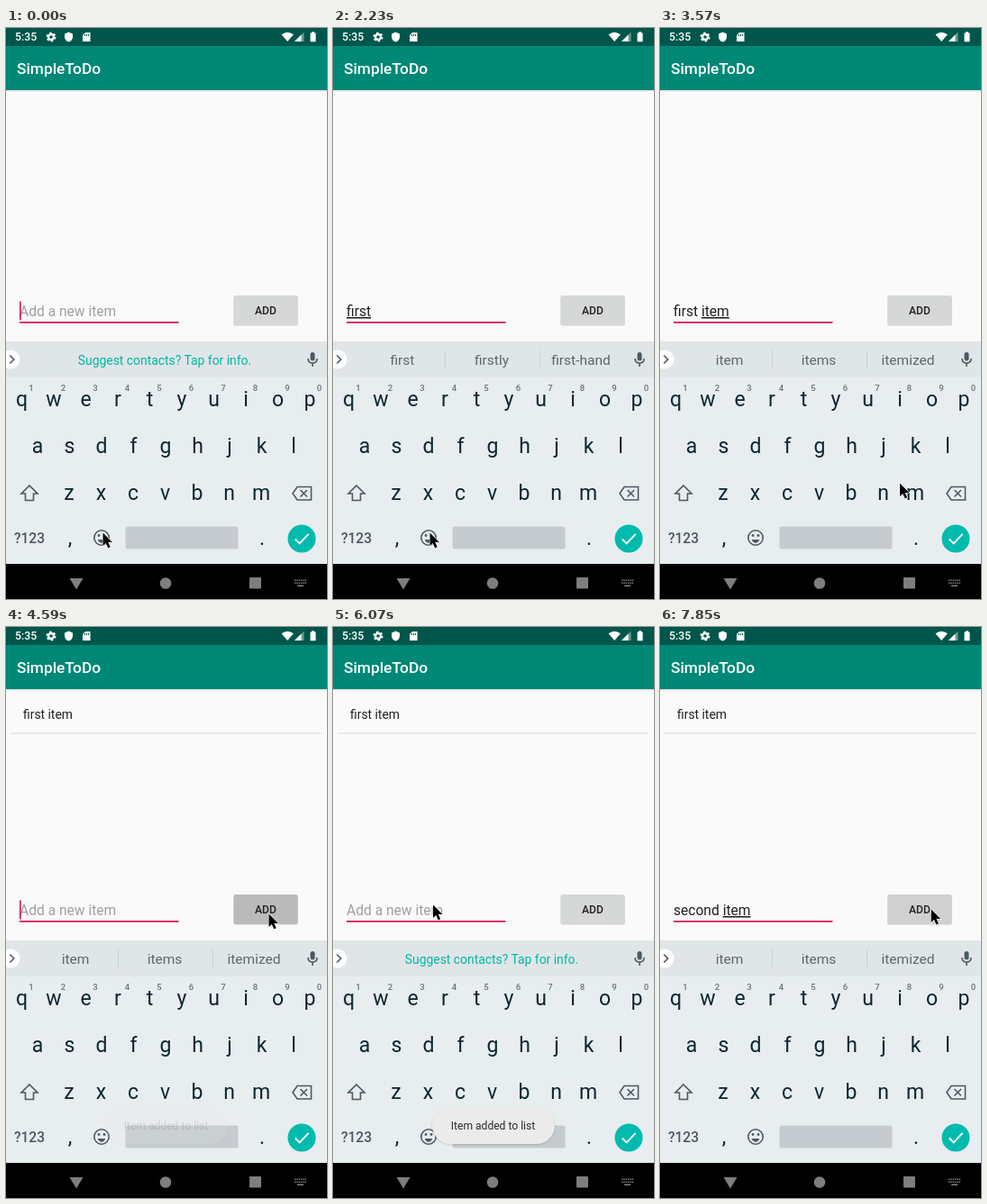
An HTML page for the animation above (8000 ms loop, 356 by 634 pixels).

```html
<!DOCTYPE html>
<html lang="en">
<head>
<meta charset="utf-8">
<title>To-do list demo</title>
<style>
html, body { margin: 0; width: 100%; height: 100%; overflow: hidden; background: #fafafa; }
svg { display: block; font-family: Roboto, sans-serif; }
text { white-space: pre; }
.mid { text-anchor: middle; }
.medium { font-weight: 500; }
.line { fill: none; stroke: #4b5a61; stroke-width: 1.6; }
#keys { font-size: 23px; fill: #0c2730; text-anchor: middle; }
#digits { font-size: 9.5px; font-weight: 500; fill: #68747a; text-anchor: middle; }
#words { font-size: 15.5px; fill: #5d676c; text-anchor: middle; }
#composing { text-decoration: underline; text-decoration-skip-ink: none; }
</style>
</head>
<body>
<svg width="356" height="634" viewBox="0 0 356 634">
  <rect width="356" height="634" fill="#fafafa"/>
  <rect y="69" width="356" height="1.5" fill="#000" opacity=".1"/>
  <rect y="20" width="356" height="49" fill="#008876"/>
  <rect width="356" height="20" fill="#00564a"/>
  <text class="medium" x="12" y="51" font-size="17.3" fill="#fff">SimpleToDo</text>

  <g id="status" fill="#fff">
    <text class="medium" x="10" y="14.2" font-size="12.3">5:35</text>
    <circle cx="50" cy="10" r="3" fill="none" stroke="#fff" stroke-width="2.4"/>
    <circle cx="50" cy="10" r="4.7" fill="none" stroke="#fff" stroke-width="1.6" stroke-dasharray="2.5 2.42"/>
    <path d="M69.500 4.500l4.500 2v3.200c0 2.800-1.900 5-4.500 5.800c-2.600-.8-4.500-3-4.500-5.800v-3.200z"/>
    <path d="M88 5h5.500v10h-8.500v-7z"/>
    <path d="M87.500 7v2M89.500 7v2M91.500 7v2" stroke="#00564a"/>
    <path d="M305.500 7.200q6.700-5 13.400 0l-6.700 7.800z"/>
    <path d="M330.500 4.500v10.500h-10.500z" opacity=".4"/>
    <path d="M327.500 7.500v7.500h-7.500z"/>
    <path d="M337.500 5.500h1.600v-1.300h2.800v1.300h1.600v9.700h-6z"/>
  </g>

  <g id="entry">
    <text x="19" y="102" font-size="13.86" fill="#212121">first item</text>
    <rect x="5" y="117.500" width="345" height="1" fill="#dcdcdc"/>
  </g>

  <rect x="15" y="326" width="176.500" height="1.800" fill="#d81b60"/>
  <text id="hint" x="15" y="320" font-size="15.6" fill="#a0a0a0">Add a new item</text>
  <text id="field" x="15" y="320" font-size="15.6" fill="#212121"><tspan id="typed"></tspan><tspan id="composing"></tspan></text>
  <rect id="caret" y="303.500" width="1.700" height="21" fill="#d81b60"/>

  <rect x="252.300" y="298" width="71.600" height="32.800" rx="2" fill="#000" opacity=".13"/>
  <rect id="button" x="252.500" y="297" width="71" height="33" rx="2"/>
  <text class="mid medium" x="288" y="318" font-size="12.1" fill="#212121">ADD</text>

  <rect y="348" width="356" height="40" fill="#e0e5e8"/>
  <rect y="387.500" width="356" height="208" fill="#e8edf0"/>
  <circle cx="5" cy="368" r="10.500" fill="#fff"/>
  <path class="line" d="M4.300 363.500l4.500 4.500l-4.500 4.500"/>
  <text id="suggest" class="mid" x="176" y="373.500" font-size="13.9" fill="#00b8a5">Suggest contacts? Tap for info.</text>
  <g id="words">
    <path d="M124.500 358v20M229.500 358v20" stroke="#cbd1d5"/>
    <text x="77" y="374"></text><text x="176" y="374"></text><text x="275" y="374"></text>
  </g>
  <rect x="337.500" y="360" width="5" height="9.500" rx="2.500" fill="#4b5a61"/>
  <path class="line" d="M335 367q0 5 5 5t5-5M340 372v4"/>

  <g id="keys"></g>
  <g id="digits"></g>
  <path class="line" d="M26 508l9 9h-4.500v7.500h-9v-7.500h-4.500z"/>
  <path class="line" d="M323 509.500h15.500v14.500h-15.500l-5-7.250zM326.500 513l7.500 7.500M334 513l-7.500 7.500"/>
  <text class="mid medium" x="26" y="571.500" font-size="15.6" fill="#4b5a61">?123</text>
  <circle class="line" cx="106" cy="566" r="8.200"/>
  <path d="M101.800 568h8.400q-1.200 3.800-4.200 3.800t-4.200-3.800" fill="#4b5a61"/>
  <circle cx="103" cy="563.500" r="1.400" fill="#4b5a61"/><circle cx="109" cy="563.500" r="1.400" fill="#4b5a61"/>
  <rect x="132.500" y="553.500" width="125" height="25" rx="2.500" fill="#c5cbcf"/>
  <circle cx="328" cy="567" r="15.500" fill="#00bbad"/>
  <path d="M320.800 567.500l4.800 4.800l10-10.500" fill="none" stroke="#fff" stroke-width="1.900"/>

  <rect y="595" width="356" height="39"/>
  <g fill="#7e7e7e">
    <path d="M70.500 611h15l-7.500 12.500z"/>
    <circle cx="177" cy="616.500" r="6.300"/>
    <rect x="270" y="610" width="13" height="12.500" rx="1"/>
    <path d="M320 613.200h13M320 616.200h13" stroke="#7e7e7e" stroke-width="1.500" stroke-dasharray="1.500 .8"/>
    <rect x="323" y="618.500" width="7" height="1.500"/>
  </g>

  <g id="toast">
    <rect x="110" y="533" width="136" height="41" rx="20.500" fill="#ebebeb" style="filter:drop-shadow(0 1px 1px rgba(0,0,0,.14))"/>
    <text class="mid" x="177.500" y="557.500" font-size="12.1" fill="#2b2b2b">Item added to list</text>
  </g>
  <path id="mouse" d="M0 0v14.400l3.300-3l2.400 5.500l2.500-1.100l-2.400-5.300h4.600z" stroke="#fff" stroke-width="1.100" style="paint-order:stroke"/>
</svg>
<script>
const LOOP = 8000;
const el = id => document.getElementById(id);
const label = (x, y, s) => `<text x="${x}" y="${y}">${s}</text>`;
const row = (chars, x, y, step = 35.5) =>
  [...chars].map((c, i) => label(x + step * i, y, c)).join('');

el('keys').innerHTML = row('qwertyuiop', 17.5, 420) + row('asdfghjkl', 35, 472) +
  row('zxcvbnm', 70, 524) + label(71, 574, ',') + label(284, 574, '.');
el('digits').innerHTML = row('1234567890', 28, 403);

// Each step starts at a time and keeps its value until the next one.
// Text steps: finished text, underlined text in progress.
const text = [
  [0, '', ''], [1050, '', 'f'], [1200, '', 'fi'], [1350, '', 'fir'], [1500, '', 'firs'], [1640, '', 'first'],
  [2670, 'first ', ''], [2820, 'first ', 'i'], [2970, 'first ', 'ite'], [3120, 'first ', 'item'],
  [4590, '', ''], [6220, '', 'se'], [6370, '', 'sec'], [6510, '', 'secon'], [6660, '', 'second'],
  [6800, 'second ', ''], [6950, 'second ', 'i'], [7100, 'second ', 'it'], [7250, 'second ', 'item']
];
const words = [
  [0, ''], [1050, 'for from first'], [1350, 'for first fire'], [1640, 'first firsts first-hand'], [1780, 'first firstly first-hand'],
  [2670, 'time one of'], [2820, 'is it in'], [2970, 'item items ite'], [3120, 'item items itemized'],
  [4740, ''], [6220, 'see send second'], [6510, 'second seconds secondly'],
  [6800, 'time one half'], [6950, 'is it in'], [7100, 'it its item'], [7250, 'item items itemized']
];
const caret = [
  [0, 1], [300, 0], [750, 1], [2230, 0], [2670, 1], [3570, 0], [4000, 1],
  [4590, 1], [5180, 0], [5630, 1], [6070, 0], [6220, 1], [7700, 0]
];
const mouse = [
  [0, 107.5, 560.5], [3570, 266, 505.5], [3715, 302, 395], [3860, 308, 332], [4000, 296, 320], [4150, 291.5, 318.5],
  [4890, 235, 312], [5040, 130, 308], [5180, 111, 308.5], [7550, 150, 304], [7700, 260, 301], [7850, 300.7, 313.5]
];
const button = [
  [0, '#d6d7d7'], [4150, '#cdcecd'], [4590, '#b9bab9'], [4740, '#c8c9c8'], [4890, '#d6d7d7'], [7850, '#cfd0cf']
];
const toast = [
  [0, 0], [4590, .13], [4740, .7], [4890, 1], [6660, .9], [6800, .45], [6950, .12], [7100, 0]
];

const at = (steps, t) => steps.findLast(step => step[0] <= t).slice(1);
const show = (id, visible) => el(id).setAttribute('opacity', +visible);
const slots = document.querySelectorAll('#words text');

function draw() {
  const t = performance.now() % LOOP;
  const [typed, composing] = at(text, t);
  const [list] = at(words, t);
  el('typed').textContent = typed;
  el('composing').textContent = composing;
  show('hint', !(typed + composing));
  el('caret').setAttribute('x', 15 + el('field').getComputedTextLength());
  show('caret', at(caret, t)[0]);
  show('entry', t >= 4590);
  show('suggest', !list);
  show('words', list);
  show('words', list !== '');
  const parts = list.split(' ');
  slots.forEach((slot, i) => slot.textContent = parts[i] || '');
  el('button').setAttribute('fill', at(button, t)[0]);
  show('toast', at(toast, t)[0]);
  el('mouse').setAttribute('transform', `translate(${at(mouse, t)})`);
  requestAnimationFrame(draw);
}
draw();
</script>
</body>
</html>
```
